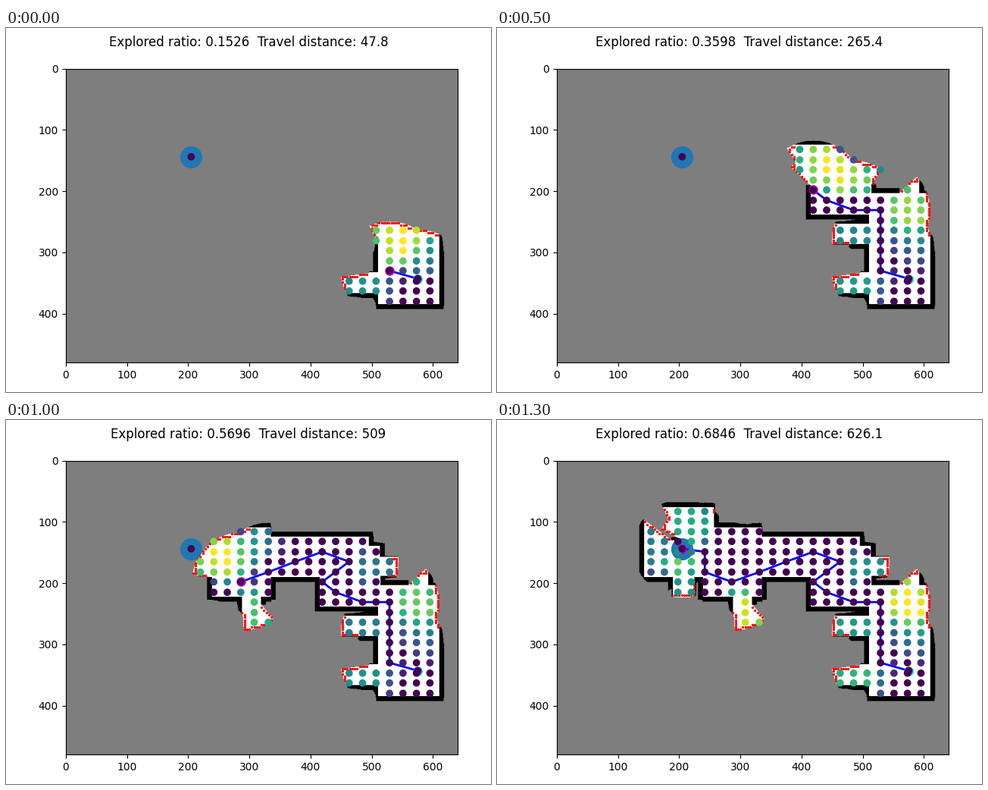
A matplotlib script for the animation above (1.4 s loop, 640 by 480 pixels).

```python
import numpy as np
import matplotlib.pyplot as plt
from matplotlib.animation import FuncAnimation

FRAMES, INTERVAL = 14, 100
SENSOR_RANGE, UTILITY_RANGE, WALL_DEPTH = 80, 70, 9
WALL, UNKNOWN, FREE = 1, 127, 255
START, GOAL = np.array([575, 343]), np.array([205, 144])

# Floor plan: rooms as x0, y0, x1, y1
ROOMS = [
    (510, 204, 610, 385), (440, 333, 510, 367), (440, 254, 510, 287),
    (560, 150, 592, 204), (415, 187, 514, 239), (330, 125, 495, 191),
    (480, 140, 513, 204), (500, 158, 552, 189), (239, 110, 335, 223),
    (288, 223, 319, 236), (288, 236, 340, 300), (143, 77, 257, 191),
    (190, 191, 225, 260),
]
PILLAR = (187, 126, 197, 131)

floor = np.zeros((480, 640), bool)
for x0, y0, x1, y1 in ROOMS:
    floor[y0:y1, x0:x1] = True
x0, y0, x1, y1 = PILLAR
floor[y0:y1, x0:x1] = False

# Roadmap nodes lie on a 30 x 30 lattice; the robot stops at some of them
nodes = np.array([(round(c * 639 / 29), round(r * 479 / 29))
                  for r in range(30) for c in range(30)])
STOPS = [(24, 20), (24, 17), (24, 14), (22, 14), (20, 13), (19, 12), (21, 10),
         (19, 9), (17, 10), (15, 11), (13, 12), (11, 11), (11, 9)]
route = np.vstack([START, [nodes[r * 30 + c] for c, r in STOPS], GOAL])
travelled = np.cumsum(np.hypot(*np.diff(route, axis=0).T))
explored = np.interp(range(FRAMES), [0, 2, 5, 7, 9, 11, 13],
                     [.1526, .267, .3598, .4106, .5193, .6198, .6846])


def scan(belief, origin):
    """Cast rays from origin; each ends at its range or inside a wall."""
    angle = np.linspace(0, 2 * np.pi, 720, endpoint=False)
    heading = np.stack([np.cos(angle), np.sin(angle)], axis=1)
    major = np.abs(heading).max(axis=1, keepdims=True)
    k = np.arange(SENSOR_RANGE + 1)
    cells = np.rint(origin + k[:, None] * (heading / major)[:, None]).astype(int)
    x, y = cells[..., 0].clip(0, 639), cells[..., 1].clip(0, 479)
    solid = ~floor[y, x]
    depth = solid.cumsum(axis=1)
    seen = (k <= SENSOR_RANGE * major) & (depth < WALL_DEPTH)
    seen &= solid | (depth == 0)
    seen = np.logical_and.accumulate(seen, axis=1)
    belief[y[seen], x[seen]] = np.where(solid[seen], WALL, FREE)


def find_frontier(belief, step=4):
    """Free cells of the coarse map that touch unknown ones."""
    coarse = belief[::step, ::step]
    h, w = coarse.shape
    unknown = np.pad(coarse == UNKNOWN, 1).astype(int)
    around = sum(unknown[dy:dy + h, dx:dx + w]
                 for dy in range(3) for dx in range(3))
    rows, cols = np.nonzero((coarse == FREE) & (around > 1) & (around < 8))
    return np.column_stack([cols, rows]) * step


def utility_of(node, frontier, belief):
    """Number of frontier cells in range and in line of sight."""
    near = frontier[np.hypot(*(frontier - node).T) < UTILITY_RANGE]
    t = np.linspace(0, 1, 50)[:, None]
    rays = np.rint(node + t * (near - node)[:, None]).astype(int)
    count = (belief[rays[..., 1], rays[..., 0]] == FREE).all(axis=1).sum()
    return count if count > 2 else 0


def visited(points, stops):
    """Nodes next to the legs already left behind."""
    if len(stops) < 2:
        return np.zeros(len(points), bool)
    t = np.linspace(0, 1, 12)[:, None]
    legs = np.vstack([a + t * (b - a) for a, b in zip(stops, stops[1:])])
    gaps = np.hypot(*(points[:, None] - legs).transpose(2, 0, 1))
    return gaps.min(axis=1) < 16.5


def explore():
    belief = np.full(floor.shape, UNKNOWN)
    scan(belief, START)
    states = []
    for i in range(FRAMES):
        robot_at = route[i + 1]
        scan(belief, robot_at)
        frontier = find_frontier(belief)
        known = nodes[belief[nodes[:, 1], nodes[:, 0]] == FREE]
        utility = np.array([utility_of(n, frontier, belief) for n in known])
        utility[visited(known, route[1:i + 1])] = 0
        utility[(known == robot_at).all(axis=1)] = 0
        states.append((belief.copy(), frontier, np.vstack([known, START, GOAL]),
                       np.append(utility, [0, 0])))
    return states


states = explore()

fig, ax = plt.subplots(figsize=(6.4, 4.8), dpi=100)
image = ax.imshow(states[0][0], cmap="gray", vmin=WALL, vmax=FREE)
ax.axis((0, 640, 480, 0))
title = fig.suptitle("Explored ratio: 0.1526  Travel distance: 47.8")
fig.tight_layout()

ax.plot(*GOAL, "o", color="tab:blue", ms=20)
path_line, = ax.plot([], [], "b", lw=2)
robot, = ax.plot([], [], "mo", ms=8)
ax.plot(*START, "co", ms=8)
frontier_dots = ax.scatter([], [], c="r", s=2, zorder=3)
node_dots = ax.scatter([0], [0], c=[0], cmap="viridis", zorder=5)


def update(i):
    belief, frontier, points, utility = states[i]
    image.set_data(belief)
    frontier_dots.set_offsets(frontier)
    node_dots.set_offsets(points)
    node_dots.set_array(utility)
    node_dots.set_clim(0, utility.max())
    path_line.set_data(*route[:i + 2].T)
    robot.set_data(*route[i + 1:i + 2].T)
    title.set_text(f"Explored ratio: {explored[i]:.4g}  "
                   f"Travel distance: {travelled[i]:.4g}")
    return []


anim = FuncAnimation(fig, update, frames=FRAMES, interval=INTERVAL,
                     repeat=True, repeat_delay=0, blit=False)
plt.show()
```
